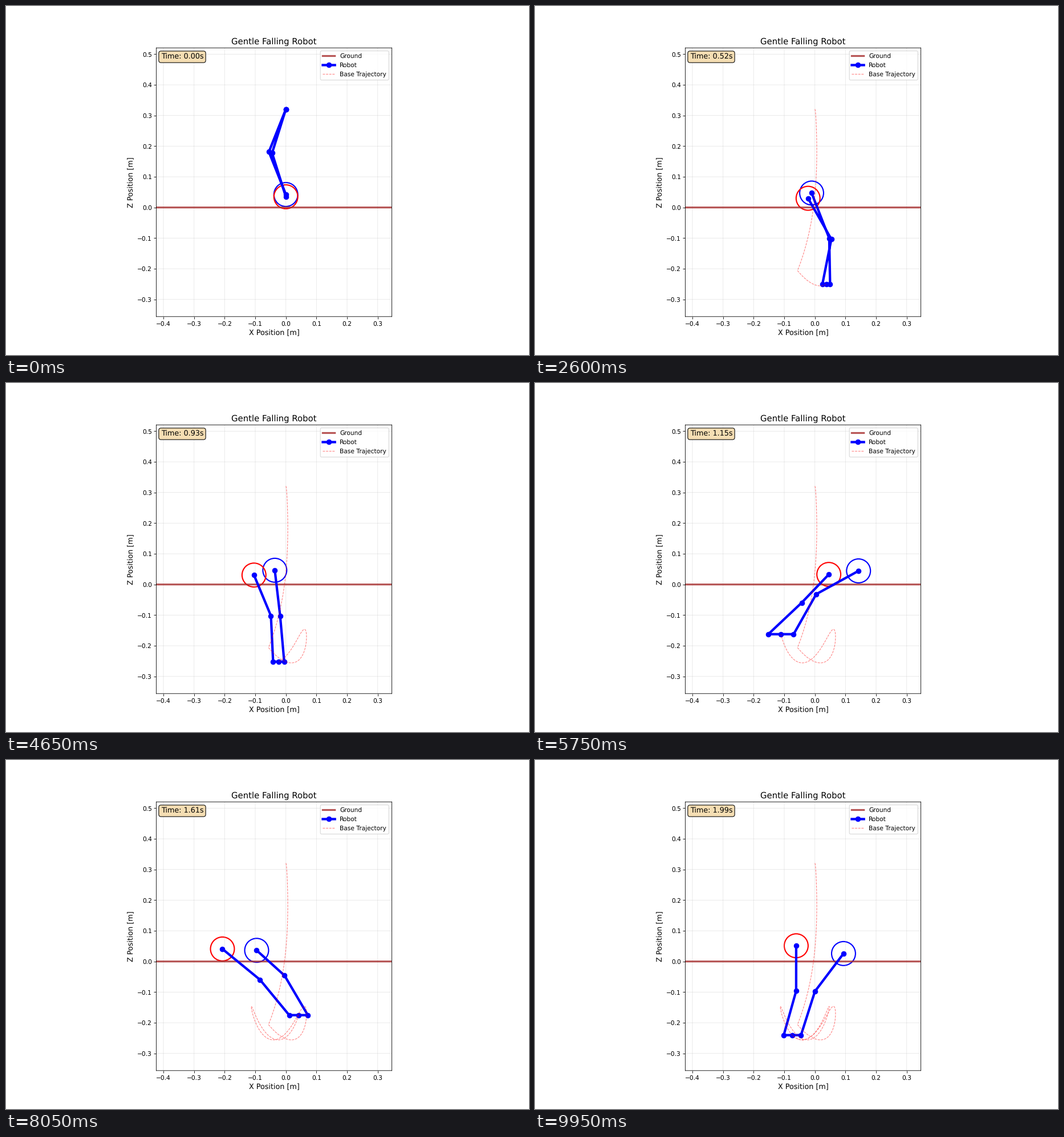
Write a matplotlib script that moves like this. It is 917 px wide and 611 px high and loops after 10000 ms.

```python
import numpy as np
import matplotlib.pyplot as plt
from matplotlib.animation import FuncAnimation

W, H, DPI = 917, 611, 76.4
FRAMES, INTERVAL = 200, 50
DT = 0.01                      # simulated seconds per frame

# Motion is worked out in screen pixels and converted to metres.
SCALE, X0, Y0 = 536.7, 490.7, 352.7
START_Y, LAND_Y, WHEEL_Y = 180.6, 465, 332
THIGH, REACH = 80.4, 158
WHEEL_RADIUS = 0.039
LAND = 0.36                    # the legs reach full stretch
CROSSING, HALF_SWING = 0.482, 0.481

plt.rcParams.update({"text.hinting": "none", "path.snap": False})


def ease(u):
    u = np.clip(u, 0, 1)
    return u * u * (3 - 2 * u)


def bump(t, centre, width):
    return np.exp(-((t - centre) / width) ** 2)


def metres(p):
    return np.array([(p[0] - X0) / SCALE, (Y0 - p[1]) / SCALE])


def body(t):
    """Base position, wheel offset and swing for a fall, then a pendulum."""
    u = np.minimum(t / LAND, 1)
    phase = np.pi * (t - CROSSING) / HALF_SWING
    swing = np.sin(phase)
    falling = t < LAND - 1e-9

    x = np.where(falling, X0 + 8 * u - 39 * u ** 6,
                 473 + 43 * np.sin(phase + 0.105) + 23 * bump(t, 0.5, 0.21))
    y = np.where(falling, START_Y + (LAND_Y - START_Y) * u ** 2,
                 WHEEL_Y + np.sqrt(REACH ** 2 - (123 * swing) ** 2))
    offset = np.where(falling, 84 * u ** 1.4, -117 * swing)
    return np.array([x, y]), offset, swing, falling


def knee(hip, wheel, swing_bend, falling):
    """Rigid thigh: folds symmetrically in the fall, flexes with the swing."""
    leg = wheel - hip
    d = np.hypot(*leg)
    fold = np.sqrt(np.maximum(THIGH ** 2 - d ** 2 / 4, 0))
    bend = np.where(falling, fold, swing_bend)
    along = np.sqrt(THIGH ** 2 - bend ** 2)
    side = np.array([-leg[1], leg[0]])
    return hip + (along * leg + bend * side) / d


def simulate():
    t = np.arange(FRAMES) * DT
    base, offset, swing, falling = body(t)

    # Turning about the vertical axis spreads the legs in side view.
    hip_gap = np.minimum(20 * t ** 0.6 + 73 * bump(t, 1.337, 0.173), 80)
    wheel_gap = 60 * ease((t - 0.3) / 1.1) + 23 * ease((t - 1.65) / 0.34)
    tilt = 4.7 - 6.4 * (t - 0.65) ** 2

    recoil = 30 * np.exp(-(t - LAND) / 0.25)
    red_bend = 8 + 28 * (1 - t / 1.6) * swing + recoil
    blue_bend = -6 + 19 * swing + recoil

    legs = []
    for sign, bend in ((-1, red_bend), (1, blue_bend)):
        hip = base + np.array([sign * hip_gap / 2, 0 * t])
        wheel = np.array([base[0] + offset + sign * wheel_gap / 2,
                          WHEEL_Y - sign * tilt])
        # Recoil is only meant for the swing, so keep the bend in range.
        bend = np.clip(bend, -THIGH, THIGH)
        legs.append([wheel, knee(hip, wheel, bend, falling), hip])
    red, blue = legs
    chain = red + [base] + blue[::-1]
    return np.array([metres(p) for p in chain])     # joint, axis, frame


joints = simulate()
base_path = joints[3]

fig, ax = plt.subplots(figsize=((W + 1e-6) / DPI, (H + 1e-6) / DPI), dpi=DPI)
fig.subplots_adjust(left=0.125, right=0.9, bottom=0.11, top=0.88)
ax.set_aspect("equal")
ax.set_xlim(-0.4234, 0.3462)
ax.set_ylim(-0.3560, 0.5206)
ax.set_xticks(np.arange(-4, 4) / 10)
ax.set_yticks(np.arange(-3, 6) / 10)
ax.grid(True, alpha=0.3)
ax.set_title("Gentle Falling Robot", fontsize=14)
ax.set_xlabel("X Position [m]", fontsize=12)
ax.set_ylabel("Z Position [m]", fontsize=12)

ax.axhline(0, color="brown", linewidth=3, alpha=0.8, label="Ground")
robot, = ax.plot([], [], "bo-", linewidth=4, markersize=8, label="Robot")
trail, = ax.plot([], [], "r--", linewidth=1, alpha=0.5, label="Base Trajectory")
wheels = [ax.add_patch(plt.Circle((0, 0), WHEEL_RADIUS, fill=False,
                                  edgecolor=c, linewidth=2))
          for c in ("blue", "red")]
clock = ax.text(0.02, 0.98, "", transform=ax.transAxes, fontsize=12, va="top",
                bbox=dict(boxstyle="round", facecolor="wheat"))
ax.legend(loc="upper right")


def update(n):
    pose = joints[:, :, n]
    robot.set_data(pose[:, 0], pose[:, 1])
    trail.set_data(*base_path[:, :n + 1])
    wheels[0].center = pose[-1]
    wheels[1].center = pose[0]
    clock.set_text(f"Time: {n * DT:.2f}s")
    return robot, trail, *wheels, clock


anim = FuncAnimation(fig, update, frames=FRAMES, interval=INTERVAL,
                     repeat=True, repeat_delay=0)
plt.show()
```
